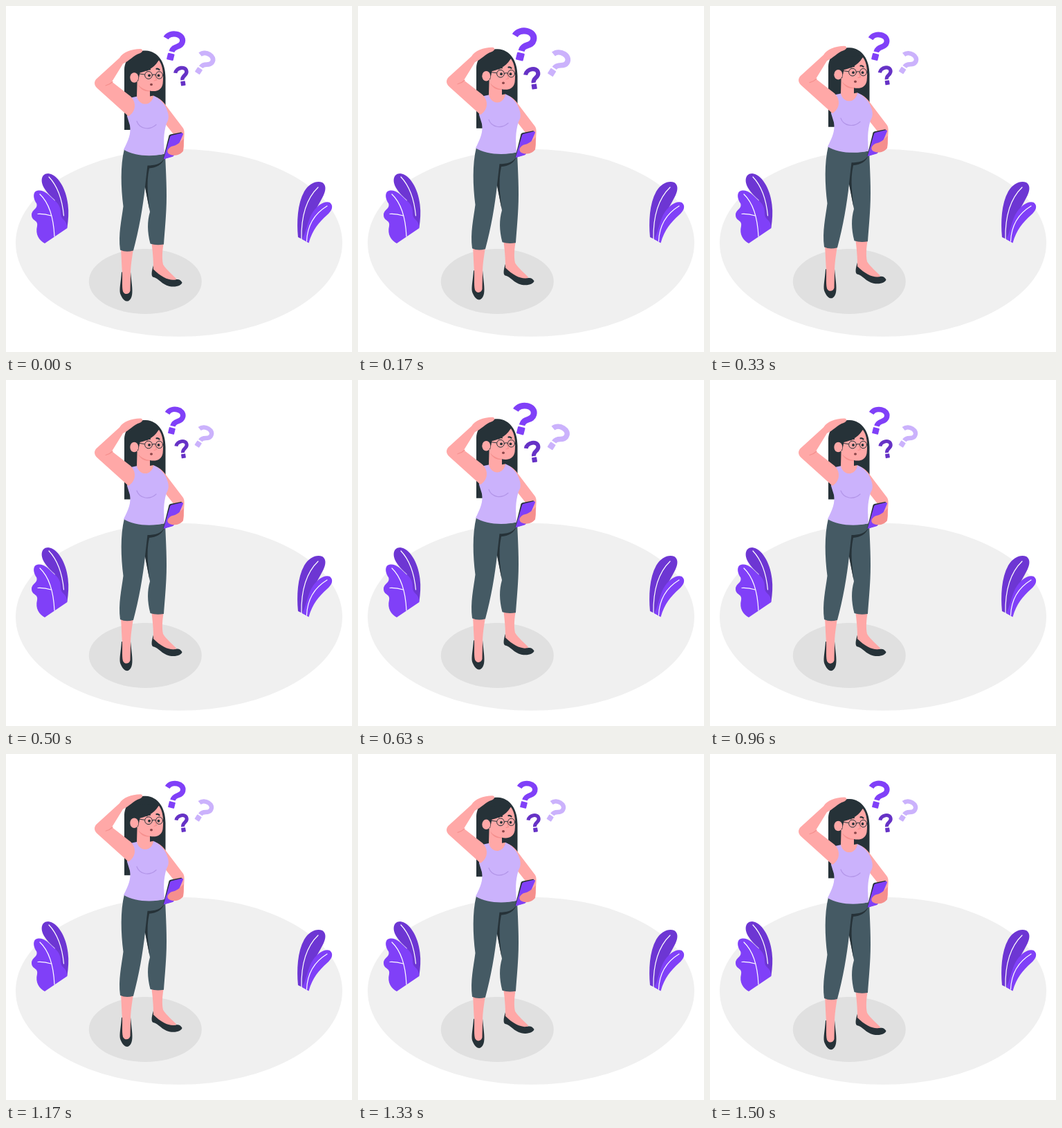
An HTML page that plays this animation: 500x500 px, repeating every 1540 ms.

```html
<!DOCTYPE html>
<html lang="en">
<head>
<meta charset="utf-8">
<title>Thinking woman</title>
<style>
  html, body { margin: 0; height: 100%; overflow: hidden; background: #fff; }
  svg { display: block; width: 100%; height: 100%; }
  .purple { fill: #8040f8; }
  .deep { fill: #6d36d3; }
  .lilac { fill: #cbb2fc; }
  .skin { fill: #ffa8a7; }
  .shade { fill: #f58f8d; }
  .dark { fill: #263238; }
  .pants { fill: #455a64; }
  .line { fill: none; stroke-linecap: round; stroke-width: 1.2; }
  .vein { stroke: #fff; }
  .ink { stroke: #263238; stroke-width: 1; }
  .brow { stroke-width: 2.2; }
</style>
</head>
<body>
<svg viewBox="0 0 500 500">
  <defs>
    <g id="mark">
      <path d="M-12.3-23.2C-9-34 10.7-35 10.7-23.3C10.7-14.5-.2-16.5-.2-7" fill="none" stroke="currentColor" stroke-width="7.6"/>
      <rect x="-4.6" y="-4.6" width="9.2" height="9.2" rx="1" fill="currentColor"/>
    </g>
  </defs>

  <ellipse cx="250" cy="342.3" rx="236" ry="135.5" fill="#f0f0f0"/>
  <ellipse cx="201.3" cy="398" rx="81.5" ry="47" fill="#e0e0e0"/>

  <g id="plants">
    <path class="deep" d="M70 330L88.500 320C90 309 91 298 89.500 287C87 263 74 243 61 242C51 242 49 253 55 263C60 271 66 276 71 281Z"/>
    <path class="purple" d="M56 343C48 339 42 330 45 318C47 309 37 311 37 302C37 294 47 293 44 285C39 278 38 267 47 266.500C56 266 63 274 69 280C78 287 79 293 79 301C80 310 88 308 88.500 321Z"/>
    <path class="line vein" d="M62 247Q80 266 83.500 303M49 272Q68 290 70 333M46 300.500Q56 300 65 303"/>
    <path class="deep" d="M422 334C420 312 421 286 431 268C438 256 449 252 457 255C465 260 461 271 455 281C445 298 437 316 434 340Z"/>
    <path class="purple" d="M428 337C435 324 436 308 444 297C451 287 461 281 468 284C474 289 471 296 464 302C452 313 443 323 437.500 342.500Z"/>
    <path class="line vein" d="M451 262Q426 286 427 337M464 289Q436 306 434.500 340"/>
  </g>

  <g id="woman">
    <path class="dark" d="M171 179.500V92C172 75 185 65 202 65C220 66 230.500 82 230.500 104V160H200L181 179.500Z"/>

    <path class="dark" d="M167 385C166 400 163.500 409 165 416C168 424 172 428 176.500 427C183 424 183 414 182 404L180 385Z"/>
    <path class="skin" d="M166 350L184 351C182 366 180 375 180 390L179.500 412C178 418 171 418 169 413C167 405 169 392 167.500 380Z"/>
    <path class="dark" d="M213 375.500C210 385 210 390 212 392C221 394 225 403 236 405.500C246 407.500 254 404 254.500 400C252 396 249 395 245 396C236 395 225 389 213 375.500Z"/>
    <path class="skin" d="M210 340L228 341C226 354 225 364 227 374C232 382 240 388 246.500 395C240 399 226 394 213 381C213 366 212 356 210 340Z"/>

    <path class="pants" d="M171 207C180 214 205 219 230 214C231 240 233 270 231.500 295C230.500 315 229 330 228 345Q217 347 208.500 344C204 326 204 312 208 298L201 262C198 290 192 325 184 354Q173 357 165 353C162 330 167 310 169.500 290C166 262 165 232 171 207Z"/>
    <path class="dark" d="M229 220C225 229 214 231 204.500 231C203 243 202 253 201 262L207.500 296C206 276 202 258 207 235C217 234 226 230 229 220Z"/>

    <path class="skin" d="M212 131C223 132 229 141 237 152L256 177C259 182 257 188 257 203L256 210C250 217 240 217 234 214L243 187L228 168Z"/>
    <path class="lilac" d="M176 134L190 131C195 145 209 145 213 130C221 133 230 142 233 152C236 160 235 165 232 170C227 186 228 198 229 214C210 219 184 217 170 208C177 194 181 185 179 173L175 160Z"/>
    <path class="line" stroke="#b295e8" d="M189 167C193 178 207 181 217 172"/>

    <path class="skin" d="M177 160L132 119.500C127 115 127 110 130.500 106L164 75.500C169 67 181 63 194 62.500C199 63 198 67 193 69C184 72 178 80 169 84L153 110L180 131C189 140 188 153 177 160Z"/>
    <path class="line" stroke="#f58f8d" d="M144 115.500Q150 114 154 110"/>

    <path class="skin" d="M190 95L221 79C227 87 228 100 226.500 113C225 122 217 125 208 123V131L213 130C211 146 192 146 189 131Z"/>
    <path class="shade" d="M191 114C195 119 201 122 208 123V124C200 124 194 121 191 114Z"/>
    <path class="dark" d="M186 78L222 76C217 88 206 94.500 193.500 97L191 109H186Z"/>
    <ellipse class="skin" cx="185.300" cy="104" rx="6" ry="7.300"/>
    <path class="line ink brow" d="M203.500 93.300Q205 91.500 208 92M217.500 91.300Q219.500 90.500 221.500 92.500"/>
    <path class="line ink" d="M193 98.500L200 99.500M212 100Q214 98.500 216 100"/>
    <circle class="line ink" cx="206" cy="100.500" r="5.400"/>
    <ellipse class="line ink" cx="221.500" cy="100.500" rx="5" ry="5.200"/>
    <circle class="dark" cx="207" cy="101" r="1.900"/>
    <circle class="dark" cx="220.500" cy="101" r="1.900"/>
    <path class="line" stroke="#f58f8d" d="M215 101L217.500 107.500L214 108.500"/>
    <ellipse cx="210" cy="114" rx="2" ry="1.700" fill="#8c4548"/>

    <path class="dark" d="M227 222L235.500 188Q236 186.500 238 186L253 183Q255 183 254 186L242 217Z"/>
    <path class="purple" d="M227.500 222L237 189.500Q237.500 188 239.500 187.500L254 184Q257 184 255.500 187L243 216Q242 218 240 218.500Z"/>
    <path class="shade" d="M257 192C251 198 247 202 239 203.500C233 207 232 211 235 214C241 218 251 217 256 210Z"/>
  </g>

  <g id="marks">
    <use href="#mark" color="#8040f8" transform="translate(239.500 73.500) rotate(14)"/>
    <use href="#mark" color="#6632c6" transform="translate(256.500 109.700) rotate(-9) scale(.67)"/>
    <use href="#mark" color="#cbb2fc" transform="translate(277.700 92.500) rotate(33) scale(.84)"/>
  </g>
</svg>
<script>
  const LOOP = 1540, LEAD = 40;
  const woman = document.getElementById('woman');
  const marks = document.getElementById('marks');

  // Eases out to the peak, then eases out back to rest.
  const easeOut = p => 1 - (1 - p) ** 2;
  function beat(p) {
    if (p < 0 || p > 1) return 0;
    return p < .5 ? easeOut(p * 2) : 1 - easeOut(p * 2 - 1);
  }

  function draw(now) {
    const phase = (now + LEAD) % LOOP / LOOP;
    const lift = 10 * (1 - Math.abs(1 - 2 * phase));
    const scale = 1 + .2 * (beat(phase / .3) + beat((phase - .35) / .3));
    woman.setAttribute('transform', `translate(0 ${-lift})`);
    marks.setAttribute('transform', `translate(265.5 75.5) scale(${scale}) translate(-265.5 -75.5)`);
  }

  const start = performance.now();
  function tick() {
    draw(performance.now() - start);
    requestAnimationFrame(tick);
  }
  tick();
</script>
</body>
</html>
```
